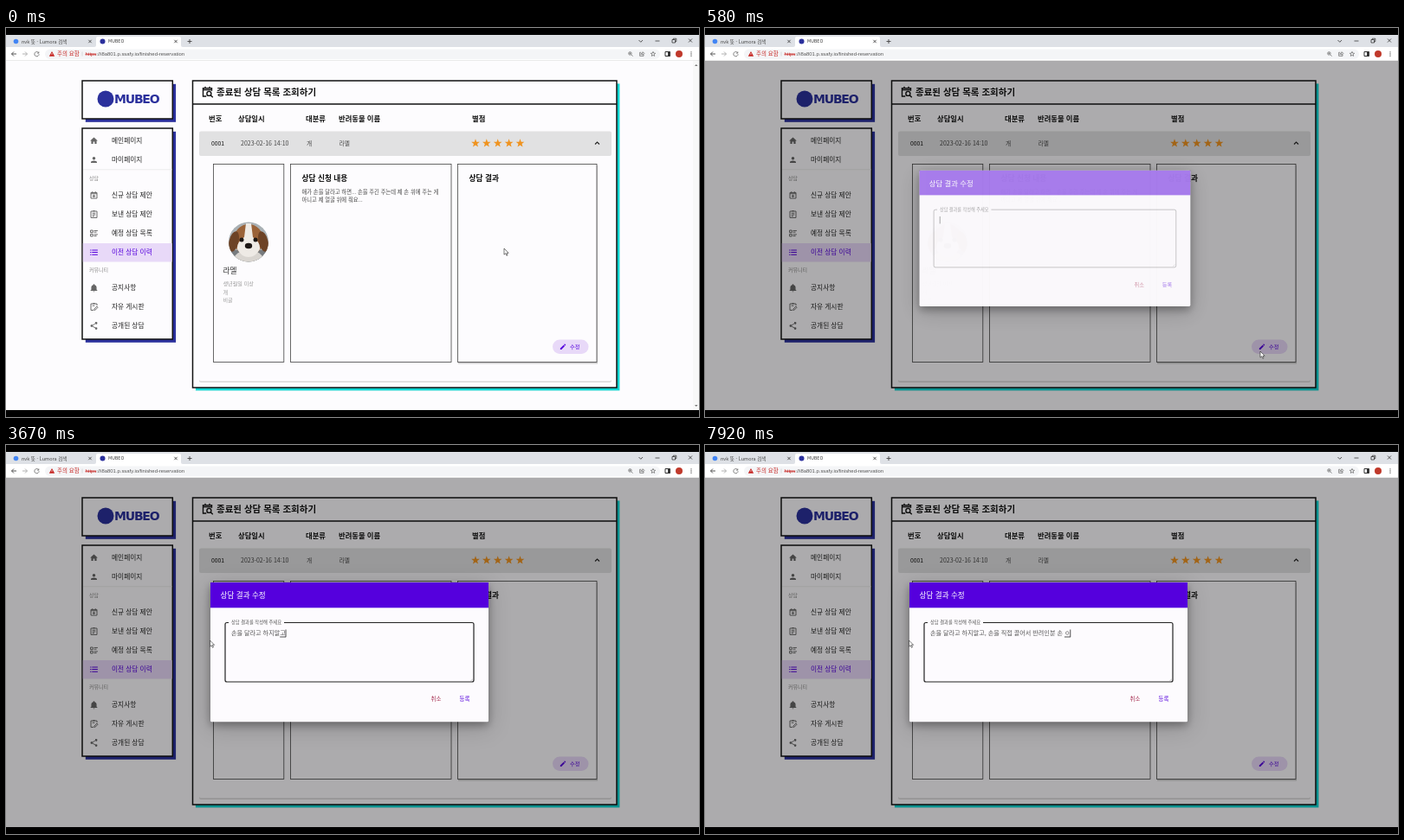
An HTML page for the animation above (8 s loop, 800 px wide and 450 px high).

```html
<!DOCTYPE html>
<html lang="ko">
<head>
<meta charset="utf-8">
<title>상담 목록</title>
<style>
html, body { margin: 0; width: 100%; height: 100%; overflow: hidden; background: #000; }
svg { display: block; width: 100%; height: 100%; }
text { font-family: "Noto Sans CJK KR", "Noto Sans CJK", "Noto Sans", sans-serif; white-space: pre; }
.url { font-family: "Liberation Sans", sans-serif; }
.brand { font-family: "DejaVu Sans", sans-serif; font-weight: 700; }
#sheet { filter: drop-shadow(0 4px 5px rgba(0,0,0,.3)) drop-shadow(0 5px 12px rgba(0,0,0,.2)); }
</style>
</head>
<body>
<svg id="stage" viewBox="0 0 800 450"></svg>
<script>
const VIOLET = '#5500dd', LILAC = '#e8d9f8', NAVY = '#2b309c', INK = '#222';

// y is the middle of the line
const text = (x, y, size, str, fill = INK, more = '') =>
  `<text x="${x}" y="${y + size * .37}" font-size="${size}" fill="${fill}" ${more}>${str}</text>`;
const bold = (x, y, size, str) => text(x, y, size, str, '#111', 'font-weight="700"');
const rect = (x, y, w, h, fill, more = '') =>
  `<rect x="${x}" y="${y}" width="${w}" height="${h}" fill="${fill}" ${more}/>`;
const disc = (x, y, r, fill) => `<circle cx="${x}" cy="${y}" r="${r}" fill="${fill}"/>`;
const line = (d, color = '#444', w = .9) =>
  `<path d="${d}" fill="none" stroke="${color}" stroke-width="${w}"/>`;
const cross = (x, y, r) => line(`M${x - r} ${y - r}l${2 * r} ${2 * r}m0 ${-2 * r}l${-2 * r} ${2 * r}`);

// icons on a 24 unit grid; a leading "-" means stroked
const icons = {
  home: 'M10 20v-6h4v6h5v-8h3L12 3 2 12h3v8z',
  person: 'M12 4a4 4 0 1 1 0 8 4 4 0 0 1 0-8zm0 10c4.4 0 8 1.8 8 4v2H4v-2c0-2.2 3.6-4 8-4z',
  plan: '-M4 5h16v15H4zM4 8h16M8 2v4M16 2v4M12 10v8M8 14h8',
  paper: '-M4 4h16v17H4zM9 3h6M8 9h8M8 13h8M8 17h5',
  tasks: '-M3 4h6v6H3zM3 14h6v6H3zM12 5h10M12 9h7M12 15h10M12 19h7',
  list: 'M7 5h15v2.4H7zM7 11h15v2.4H7zM7 17h15v2.4H7zM2 5h3v2.4H2zM2 11h3v2.4H2zM2 17h3v2.4H2z',
  bell: 'M21 19v1H3v-1l2-2v-6c0-3.1 2-5.8 5-6.7V4a2 2 0 0 1 4 0v.3c3 .9 5 3.6 5 6.7v6zm-7 2a2 2 0 0 1-4 0z',
  note: '-M20 9V4H4v17h7M9 3h6M13 21v-3l7-7 2 3-7 7zM8 9h6',
  share: 'M18 16c-.8 0-1.4.3-2 .8l-7.1-4.2a3 3 0 0 0 0-1.4L16 7.1A3 3 0 1 0 15 5l.1.7L8 9.8a3 3 0 1 0 0 4.4l7.1 4.2-.1.6a3 3 0 1 0 3-3z',
  pencil: 'M20.7 7a1 1 0 0 0 0-1.4l-2.3-2.3a1 1 0 0 0-1.4 0l-1.9 1.8 3.8 3.8M3 17.2V21h3.8L17.8 9.9l-3.7-3.7z',
  search: '-M10 4a6 6 0 1 1 0 12 6 6 0 0 1 0-12zM15 15l6 6M7 10h6M10 7v6',
  send: '-M9 6H4v14h15v-5M8 14c1-5 4-6 8-6V4l6 6-6 6v-4c-4 0-6 0-8 2z',
  star: '-M12 3l2.7 6 6.5.6-5 4.3 1.5 6.4-5.7-3.4-5.7 3.4 1.5-6.4-5-4.3 6.5-.6z',
  reload: '-M19 7A9 9 0 1 0 21 13M20 3v6h-6',
  find: '-M10 20H4V5h16v5M4 8h16M8 2v4M16 2v4M15 11a4 4 0 1 1 0 8 4 4 0 0 1 0-8zM18 18l4 4'
};
function icon(name, x, y, size, color = '#555') {
  const d = icons[name], k = size / 24, stroked = d[0] === '-';
  const paint = stroked ? `fill="none" stroke="${color}" stroke-width="2.2"` : `fill="${color}"`;
  return `<path transform="translate(${x - size / 2} ${y - size / 2}) scale(${k})" d="${d.slice(stroked)}" ${paint}/>`;
}

function browser() {
  return rect(0, 8, 800, 14, '#dee1e6') + rect(0, 22, 800, 16, '#fff')
    + `<path d="M102 22q2 0 2-2v-8q0-2 2-2h94q2 0 2 2v8q0 2 2 2z" fill="#fff"/>`
    + disc(11.5, 15.5, 2.8, '#4285f4') + text(18, 15.5, 5.5, 'nvk 뜻 - Lumora 검색', '#444') + cross(97, 15.5, 1.7)
    + disc(111.5, 15.5, 3, NAVY) + text(118, 15.5, 5.2, 'MUBEO', '#333') + cross(196, 15.5, 1.7)
    + line('M209.5 15.5h5m-2.5-2.5v5') + line('M730.5 14l2.3 2.3 2.3-2.3')
    + line('M749.5 15h5M769 13.5h3.5v3.5h-3.5zM770.3 13.5v-1.3h3.5v3.5h-1.3', '#222', .7) + cross(790, 14.5, 2)
    + line('M12 30H6.5m2.5-2.5L6.5 30 9 32.5') + line('M19 30h5.5M22 27.5l2.5 2.5-2.5 2.5', '#aaa')
    + icon('reload', 35.5, 30, 7, '#444')
    + rect(45, 24.5, 710, 11.5, '#f4f5f7', 'rx="5.7"')
    + '<path d="M53 27l3.2 5.8h-6.4z" fill="#c5221f"/>' + line('M53 29v2', '#fff', .7)
    + text(59, 30, 6.5, '주의 요함', '#c5221f') + line('M88 27.5v5', '#bbb', .5)
    + text(91.5, 30, 5.9, '<tspan fill="#c5221f" text-decoration="line-through">https</tspan>://i8a801.p.ssafy.io/finished-reservation', '#555', 'class="url"')
    + icon('search', 721, 30, 7) + icon('send', 734, 30, 7) + icon('star', 747, 30, 7)
    + line('M761 27.5h5.5v5H761z', '#333', 1) + rect(764, 27.5, 2.5, 5, '#333')
    + disc(777, 30, 4, '#c0392b')
    + [27.8, 30, 32.2].map(y => disc(791, y, .65, '#444')).join('')
    + rect(0, 37.4, 800, .6, '#dcdcdc');
}

// outlined box with a solid offset shadow
const box = (x, y, r, b, color, off) => rect(x + off, y + off, r - x, b - y, color)
  + rect(x, y, r - x, b - y, '#fdfcfe', 'stroke="#111" stroke-width="1.5"');

function sidebar() {
  const items = [
    [130.5, 'home', '메인페이지'], [152.5, 'person', '마이페이지'],
    [193.5, 'plan', '신규 상담 제안'], [215.5, 'paper', '보낸 상담 제안'],
    [237.5, 'tasks', '예정 상담 목록'], [259.5, 'list', '이전 상담 이력'],
    [300.5, 'bell', '공지사항'], [322.5, 'note', '자유 게시판'], [344.5, 'share', '공개된 상담']
  ];
  return box(88, 61, 192.3, 105, NAVY, 3.8) + disc(115, 82, 9.5, NAVY)
    + text(125, 82, 14, 'MUBEO', NAVY, 'class="brand" letter-spacing="-1.2"')
    + box(88, 116, 192.3, 360, NAVY, 3.8)
    + rect(88.8, 249, 102.8, 21.5, LILAC) + line('M89 163.8h103', '#ddd', .6)
    + text(96, 173.5, 6, '상담', '#888') + text(96, 279.5, 6, '커뮤니티', '#888')
    + items.map(([y, pic, name]) => {
        const on = pic === 'list';
        return icon(pic, 101.5, y, 10.5, on ? VIOLET : '#666') + text(122, y, 7.7, name, on ? VIOLET : INK);
      }).join('');
}

function starShape(x, y) {
  const pts = Array.from({ length: 10 }, (_, i) => {
    const a = i * Math.PI / 5, r = i % 2 ? 2.1 : 5.1;
    return `${(x + r * Math.sin(a)).toFixed(2)},${(y + .4 - r * Math.cos(a)).toFixed(2)}`;
  });
  return `<polygon points="${pts.join(' ')}" fill="#ef9320"/>`;
}

function dog() {
  return `<clipPath id="round"><circle cx="280" cy="247.5" r="23"/></clipPath>
    <g clip-path="url(#round)">${rect(256, 224, 48, 48, '#a9b0b4')}${rect(256, 257, 48, 15, '#777b7e')}
    <ellipse cx="280" cy="268" rx="17" ry="11" fill="#d9d5d0"/>
    <ellipse cx="280" cy="245" rx="17" ry="18" fill="#9a6238"/>
    <ellipse cx="263" cy="247" rx="5.5" ry="12" fill="#6d4326" transform="rotate(14 263 247)"/>
    <ellipse cx="297" cy="247" rx="5.5" ry="12" fill="#6d4326" transform="rotate(-14 297 247)"/>
    <path d="M277 226h6l2 16q9 6 8 14-5 9-13 9t-13-9q-1-8 8-14z" fill="#eeeae5"/>
    ${disc(272, 245, 2.5, '#1c1614')}${disc(288, 245, 2.5, '#1c1614')}
    <ellipse cx="280" cy="252" rx="4.2" ry="3.2" fill="#1c1614"/></g>`;
}

function board() {
  const heads = [[234, '번호'], [268, '상담일시'], [346, '대분류'], [384, '반려동물 이름'], [538, '별점']];
  const card = (x, r) => rect(x, 157.5, r - x, 229, '#fdfcfe', 'stroke="#444" stroke-width=".8"');
  return box(215.5, 61, 705, 416, '#0fd6d2', 3.4) + line('M215 88h490', '#111', 1.3)
    + icon('find', 232.5, 74, 15, '#111') + bold(243, 74, 10.5, '종료된 상담 목록 조회하기')
    + heads.map(([x, s]) => bold(x, 104.5, 8.3, s)).join('')
    + rect(223, 120, 476, 290, '#d8d8d8', 'rx="2"') + rect(223, 119, 476, 289.5, '#fdfcfe', 'rx="2"')
    + rect(223, 119.5, 476, 28.5, '#e1e1e2', 'rx="2"')
    + text(237, 133.5, 6.8, '0001', '#111', 'font-weight="500"') + text(271, 133.5, 7, '2023-02-16 14:10', '#444')
    + text(347, 133.5, 6.7, '개', '#444') + text(384.5, 133.5, 6.7, '라멜', '#444')
    + [542, 554.8, 567.7, 580.6, 593.5].map(x => starShape(x, 133)).join('')
    + line('M680 134.5l2.5-2.5 2.5 2.5', '#222', 1.1)
    + card(239.5, 320.8) + card(328.5, 514) + rect(522, 159, 161, 229.5, '#ccc') + card(521.5, 682)
    + dog() + text(250.5, 280.5, 8.7, '라멜', '#333')
    + text(250.5, 296, 6.1, '생년월일 미상', '#999') + text(250.5, 305.5, 6.1, '개', '#999') + text(250.5, 315, 6.1, '비글', '#999')
    + bold(341.5, 174, 8.7, '상담 신청 내용')
    + text(341.5, 189.5, 6.3, '애가 손을 달라고 하면... 손을 주긴 주는데 제 손 위에 주는 게', '#444')
    + text(341.5, 199, 6.3, '아니고 제 얼굴 위에 줘요...', '#444')
    + bold(534.5, 174, 8.7, '상담 결과')
    + rect(631, 360.5, 41.5, 16.5, LILAC, 'rx="8.2"') + icon('pencil', 643, 368.7, 8.5, VIOLET)
    + text(651, 369, 6.2, '수정', VIOLET, 'font-weight="500"');
}

function dialog() {
  return `<g id="dialog"><g id="sheet">${rect(236, 159, 321, 161.3, '#fdfbfe', 'rx="1.5"')}</g><g id="form">`
    + rect(236, 159, 321, 29.3, VIOLET) + text(247.5, 174, 8.6, '상담 결과 수정', '#fff')
    + '<path id="field" d="M257 205.5h-2q-2 0-2 2v64.5q0 2 2 2h283q2 0 2-2v-64.5q0-2-2-2H321" fill="none" stroke="#222"/>'
    + line('M536.5 273l2.5-2.5', '#888', .5) + text(260, 205, 5.3, '상담 결과를 작성해 주세요', '#555')
    + text(260, 217.8, 7.1, '', '#555', 'id="typed"') + line('', '#222', .8).replace('<path', '<path id="caret"')
    + text(490.5, 294, 6.4, '취소', '#a3284c') + text(523.5, 294, 6.4, '등록', VIOLET) + '</g></g>';
}

const $ = id => document.getElementById(id);
$('stage').innerHTML = rect(0, 0, 800, 450, '#000') + browser() + rect(0, 38, 800, 404, '#fdfcfe')
  + `<g id="bar">${rect(793, 38, 7, 404, '#f8f8f8')}<path d="M795 44l1.8-2 1.8 2zM795 436l1.8 2 1.8-2z" fill="#777"/></g>`
  + sidebar() + board() + rect(0, 38, 800, 404, '#000', 'id="scrim"') + dialog()
  + '<path id="mouse" d="M0 0v7.2l1.7-1.5 1.2 2.6 1.1-.5-1.1-2.5h2.2z" fill="#fff" stroke="#222" stroke-width=".6"/>';

// Typing: [first key, last key, text]; "<" erases one character
const script = [
  [1420, 1580, '손'], [1750, 2500, '을 달'], [2580, 3000, '라고 '], [3170, 3500, '하지말'],
  [3670, 3670, '고'], [3750, 3830, ', '], [4000, 4330, '손을'], [4500, 4830, ' 직접'],
  [5000, 5670, ' 끌어서 '], [5790, 6000, '손 우'], [6170, 6450, '<<<'], [6560, 6830, '반'],
  [7000, 7750, '려인분 손'], [7830, 7920, ' ㅇ']
];
const LEADS = 'ㄱㄲㄴㄷㄸㄹㅁㅂㅃㅅㅆㅇㅈㅉㅊㅋㅌㅍㅎ';

// stages a syllable passes through while it is composed
function stages(ch) {
  const n = ch.charCodeAt(0) - 0xAC00;
  if (n < 0 || n > 11171) return [ch];
  const out = [LEADS[Math.floor(n / 588)], String.fromCharCode(0xAC00 + n - n % 28)];
  return n % 28 ? [...out, ch] : out;
}
const keys = [{ at: 0, str: '' }];
let done = '';
for (const [from, to, chars] of script) {
  const part = [];
  for (const ch of chars) {
    if (ch === '<') part.push(done = done.slice(0, -1));
    else {
      part.push(...stages(ch).map(s => done + s));
      done += ch;
    }
  }
  part.forEach((str, i) => keys.push({ at: part.length > 1 ? from + (to - from) * i / (part.length - 1) : from, str }));
}

const clamp = v => Math.max(0, Math.min(1, v));
const smooth = p => p * p * (3 - 2 * p);

// cubic-bezier(0, 0, .2, 1)
function decelerate(p) {
  let lo = 0, hi = 1;
  for (let i = 0; i < 20; i++) {
    const u = (lo + hi) / 2;
    if (.6 * u * u * (1 - u) + u * u * u < p) lo = u; else hi = u;
  }
  return smooth(hi);
}

let shown = null;
function type(t) {
  const { str } = keys.findLast(k => k.at <= t);
  if (str === shown) return;
  shown = str;
  const node = $('typed'), width = s => {
    node.textContent = s;
    return s ? node.getComputedTextLength() : 0;
  };
  const start = 260 + width(str.slice(0, -1)), end = 260.3 + width(str);
  const composing = /[ㄱ-ㅎ가-힣]$/.test(str);
  $('caret').setAttribute('d', `M${end} 213.5v8.7` + (composing ? `M${start} 222H${end}` : ''));
}

const OPEN = 407;
function draw(t) {
  const grow = decelerate(clamp((t - OPEN) / 225)), away = 1 - grow, size = 1 - .877 * away;
  $('bar').style.display = t > OPEN ? 'none' : '';
  $('scrim').setAttribute('opacity', .32 * clamp((t - OPEN) / 160));
  $('dialog').setAttribute('opacity', grow);
  $('dialog').setAttribute('transform',
    `translate(${396.5 + 255.5 * away} ${239.6 + 129.5 * away}) scale(${size}) translate(-396.5 -239.6)`);
  $('form').setAttribute('opacity', clamp((t - 510) / 140));
  $('field').setAttribute('stroke-width', t > 680 ? 1.2 : .5);
  type(t);

  const go = smooth(clamp((t - 80) / 320)), back = smooth(clamp((t - 850) / 550));
  $('mouse').setAttribute('transform', `translate(${575 + 66 * go - 405.5 * back} ${255 + 119 * go - 148 * back})`);
}

const begin = performance.now();
function tick() {
  draw((performance.now() - begin) % 8000);
  requestAnimationFrame(tick);
}
tick();
</script>
</body>
</html>
```
